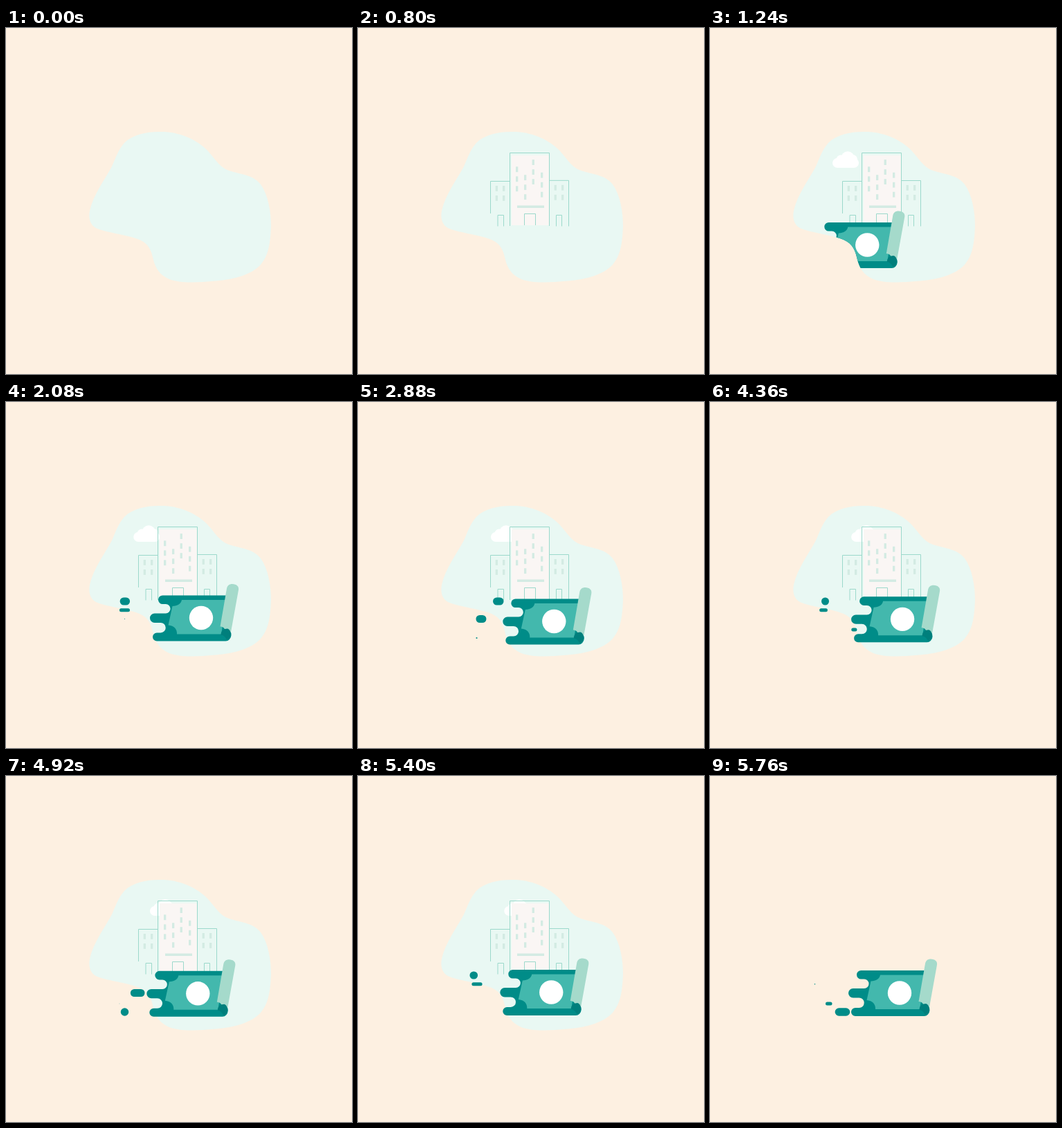
These frames come from a looping animation (500 px wide and 500 px high, 5800 ms). An HTML page:

```html
<!DOCTYPE html>
<html lang="en">
<head>
<meta charset="utf-8">
<title>Money on the move</title>
<style>
  html, body { margin: 0; width: 100%; height: 100%; overflow: hidden; background: #fdf0e1; }
  svg { display: block; width: 100vw; height: 100vh; }
  .outline path { fill: none; stroke: #9bd9cb; stroke-width: 1; vector-effect: non-scaling-stroke; }
  .windows { fill: #d3ebe3; }
  .dark { fill: #008c88; }
  #puffs { stroke: #008c88; stroke-linecap: round; }
</style>
</head>
<body>
<svg viewBox="0 0 500 500">
  <defs>
    <path id="blob" d="M221 150C248 149 273 160 288 174C301 186 306 200 322 206C340 212 357 212 368 226C379 241 383 266 383 286C382 310 380 328 368 342C354 357 330 363 303 365.5C275 368 252 369 236 363C222 357 216 347 213 335C210 322 207 312 193 306C173 298 145 296 130 289C121 284 119 274 121 264C126 241 143 219 153 200C158 189 162 176 171 166C183 154 203 150 221 150Z"/>
    <clipPath id="inBlob"><use href="#blob"/></clipPath>
  </defs>

  <g id="scene">
    <use href="#blob" fill="#e9f8f3"/>
    <g id="cloud" fill="#fff">
      <rect x="177" y="188" width="38" height="14" rx="7"/>
      <circle cx="189" cy="190" r="6.5"/>
      <circle cx="199" cy="188" r="9.7"/>
      <circle cx="206" cy="190" r="7"/>
    </g>
    <g id="left">
      <g class="outline">
        <path d="M191.5 268V221.5H219.5"/>
        <path d="M202 286.5V270.5H210.5V286.5"/>
      </g>
      <g class="windows"></g>
    </g>
    <g id="right">
      <g class="outline">
        <path d="M276.5 220.5H304.5V286.5"/>
        <path d="M286.5 286.5V270.5H294.5V286.5"/>
      </g>
      <g class="windows"></g>
    </g>
    <g id="tower">
      <rect x="222" y="184" width="54" height="101" fill="#faf6f4"/>
      <g class="outline">
        <path d="M219.5 286V180.5H276.5V286"/>
        <path d="M240.5 285V268.5H256.5V285"/>
      </g>
      <g class="windows"><rect x="230" y="256.5" width="39" height="3.5"/></g>
    </g>
  </g>

  <g id="puffs"></g>

  <g id="mask">
    <g id="bill">
      <path class="dark" d="M218.3 281H316L310 329A8 9 0 0 1 309 347H210A6 6 0 0 1 210 335H215.5A7.25 7.25 0 0 0 215.5 320.5H206.7A6.7 6.7 0 0 1 206.7 307.1H222.8A6.75 6.75 0 0 0 222.8 293.6H218.3A6.3 6.3 0 0 1 218.3 281Z"/>
      <path fill="#43b8ad" d="M246 287.5H311L303 337H239C239.5 330 235 324.5 226.5 324L232.5 296.5C240 296.5 245 293 246 287.5Z"/>
      <circle cx="274" cy="313.5" r="17.2" fill="#fff"/>
      <path fill="#a5dacb" d="M301.5 326L311 271C312 266.5 315 264.5 319 264.5C325 264.5 329 268 328 273L317 334L309 332C308 328 305 326 301.5 326Z"/>
      <path fill="#007f7c" d="M302.5 338C302.5 332 307 329 312 329C315.5 330 317 334 317 338C316 342 314 344.5 311 345C309 341 306 338 302.5 338Z"/>
    </g>
  </g>
</svg>
<script>
const LOOP = 5800, BASE = 286;
const $ = id => document.getElementById(id);
const clamp = (v, lo = 0, hi = 1) => Math.min(hi, Math.max(lo, v));

function add(parent, tag, attrs) {
  const el = document.createElementNS('http://www.w3.org/2000/svg', tag);
  for (const k in attrs) el.setAttribute(k, attrs[k]);
  return parent.appendChild(el);
}

// Windows: a column holds rows at a fixed pitch.
function column(id, x, y, rows) {
  const box = document.querySelector(`#${id} .windows`);
  for (let i = 0; i < rows; i++)
    add(box, 'rect', { x, y: y + i * 14, width: 3.3, height: 7.8 });
}
[[228, 200.4], [240, 212.3], [251.6, 190.2], [264, 208.8]].forEach(([x, y]) => column('tower', x, y, 3));
[198.7, 209].forEach(x => column('left', x, 228, 2));
[283.6, 294].forEach(x => column('right', x, 227, 2));

// Keys are rows of [time, value, value, ...].
function sample(keys, t, smooth) {
  const last = keys.length - 1;
  if (t <= keys[0][0]) return keys[0].slice(1);
  if (t >= keys[last][0]) return keys[last].slice(1);
  let i = 0;
  while (t >= keys[i + 1][0]) i++;
  const p = keys[i], q = keys[i + 1], span = q[0] - p[0], u = (t - p[0]) / span;
  const before = keys[Math.max(0, i - 1)], after = keys[Math.min(last, i + 2)];
  return p.slice(1).map((v, n) => {
    const k = n + 1, w = q[k];
    if (!smooth) return v + (w - v) * u;
    const m0 = (w - before[k]) / (q[0] - before[0]) * span;
    const m1 = (after[k] - v) / (after[0] - p[0]) * span;
    return v + u * (m0 + u * (3 * (w - v) - 2 * m0 - m1 + u * (2 * (v - w) + m0 + m1)));
  });
}

function backOut(u, s = 1.5) {
  const v = u - 1;
  return 1 + v * v * ((s + 1) * v + s);
}

// Centre of the coin over time.
const billKeys = [
  [840, 64, 313], [1040, 158, 312.5], [1240, 227, 313.5], [1440, 268, 315],
  [1640, 280, 317], [1840, 283, 315], [2080, 282, 312], [2480, 280, 313.5],
  [2880, 283.3, 317], [3280, 281, 313.3], [3760, 276, 312.5], [4200, 279, 314],
  [4560, 276.5, 313.5], [4920, 277.3, 314.3], [5360, 279.5, 312.5], [5760, 274, 313.5]
];
const cloudKeys = [[1240, 0], [2080, 7.2], [2880, 15], [3760, 23], [4920, 31], [5800, 37]];

// Ends of a puff's centre line, by time left until it vanishes.
const puffKeys = [
  [-600, 222, 224], [-520, 202, 207], [-460, 190, 201], [-370, 186, 196],
  [-275, 176, 180], [-220, 173, 175], [-140, 171.5, 171.5]
];
const lanes = [
  { y: 288, size: 11, shift: -5, first: 2340, period: 1075 },
  { y: 300.8, size: 5, shift: -20, first: 2460, period: 1110 },
  { y: 313.5, size: 11, shift: 0, first: 2090, period: 1065 },
  { y: 329, size: 5, shift: -7.5, first: 2700, period: 1115 },
  { y: 341, size: 11.5, shift: 0, first: 2900, period: 1080 }
];
for (const lane of lanes) lane.el = add($('puffs'), 'line', { y1: lane.y, y2: lane.y });

function drawPuff({ el, y, size, shift, first, period }, t) {
  const cycle = Math.max(0, Math.ceil((t - first) / period));
  const left = t - first - cycle * period;
  const shown = left > -600 && left < 0;
  el.style.display = shown ? '' : 'none';
  if (!shown) return;
  const [a, b] = sample(puffKeys, left);
  el.setAttribute('x1', a + shift);
  el.setAttribute('x2', b + shift + 0.01);
  el.setAttribute('stroke-width', size * clamp(-left / 100));
}

function rise(id, start, t) {
  const u = clamp((t - start) / 420);
  $(id).style.display = u > 0 ? '' : 'none';
  $(id).setAttribute('transform', `translate(0 ${BASE}) scale(1 ${backOut(u)}) translate(0 ${-BASE})`);
}

function draw(t) {
  $('scene').style.display = t < 5720 ? '' : 'none';
  rise('tower', 260, t);
  rise('left', 340, t);
  rise('right', 400, t);

  const pop = clamp((t - 850) / 350);
  const grow = pop > 0 ? backOut(pop, 2) : 0;
  const [drift] = sample(cloudKeys, t);
  $('cloud').setAttribute('transform', `translate(${196 + drift} 192) scale(${grow}) translate(-196 -192)`);

  const [x, y] = sample(billKeys, t, true);
  $('bill').setAttribute('transform', `translate(${x - 274} ${y - 313.5})`);
  $('mask').style.display = t > 840 ? '' : 'none';
  if (t < 1600) $('mask').setAttribute('clip-path', 'url(#inBlob)');
  else $('mask').removeAttribute('clip-path');

  lanes.forEach(lane => drawPuff(lane, t));
}

const begin = performance.now();
function tick() {
  draw((performance.now() - begin) % LOOP);
  requestAnimationFrame(tick);
}
tick();
</script>
</body>
</html>
```
